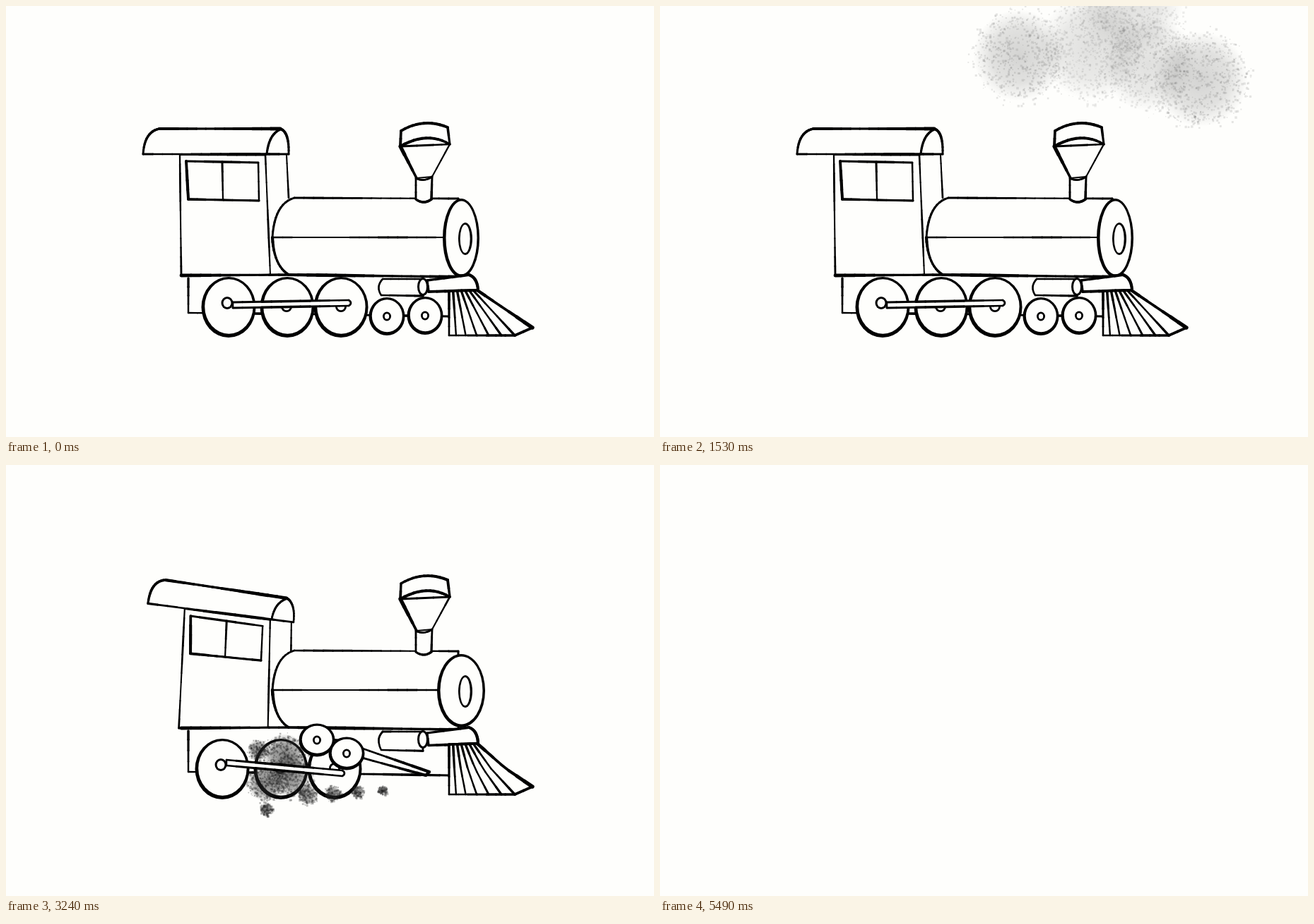
Animation of 917 by 611 pixels, one loop 5.58 s. Source, as an HTML page with a canvas:

```html
<!DOCTYPE html>
<html lang="en">
<head>
<meta charset="utf-8">
<title>Little engine</title>
<style>
html, body { margin: 0; width: 100%; height: 100%; overflow: hidden; background: #fefefc; }
canvas { display: block; }
</style>
</head>
<body>
<canvas id="stage" width="917" height="611"></canvas>
<script>
const ctx = document.getElementById('stage').getContext('2d');
const PAPER = '#fefefc', INK = '#000', STEP = 90, STEPS = 62, LAUNCH = 50;

const lerp = (a, b, k) => a + (b - a) * k;
const clamp = v => Math.min(1, Math.max(0, v));
const between = (p, q, k) => [lerp(p[0], q[0], k), lerp(p[1], q[1], k)];

function ramp(s, a, b) {
  const t = clamp((s - a) / (b - a));
  return t * t * (3 - 2 * t);
}

const hump = (s, a, b) => Math.sin(Math.PI * clamp((s - a) / (b - a))) ** 2;

// bend: nose dips; tilt: cab rocks; swing: front wheels jump back; go: long travelling shape
function poseAt(s) {
  const ready = hump(s, 0, 8), windup = hump(s, 44, LAUNCH);
  const swing = ramp(s, 21, 25) * (1 - ramp(s, 40, 43)) * Math.cos(Math.PI * (s - 25) / 11) ** 2;
  return {
    bend: ramp(s, 8, 10) * (1 - ramp(s, 14, 17)),
    tilt: ready + swing + windup,
    stretch: 1 + .03 * ready + .09 * windup,
    swing,
    go: s < LAUNCH ? 0 : 1
  };
}

// Each warp moves a point of the resting engine into the pose.
function warps({ bend, tilt, go }) {
  const body = ([x, y]) => {
    const u = x - 470, k = (u < 0 ? .00065 : .0008) * bend, t = clamp((x - 377) / 265);
    return [
      x - 2 * k * u * (u < 0 ? .4 : .7) * (y - 312) + go * (215 + 80 * t * t),
      y - 16 * bend + k * u * u + 9 * go - 9 * tilt * clamp((430 - y) / 30)
    ];
  };
  const cab = ([x, y]) => {
    const [bx, by] = body([x, y]), h = clamp((382 - y) / 200);
    return [bx + tilt * .06 * (325 - y), by + tilt * h * (9 + .15 * (x - 290))];
  };
  const gear = ([x, y]) => [
    x - 9 * tilt + go * (248 + .13 * (x - 315)),
    body([x, 440])[1] + y - 440 + 4 * tilt
  ];
  const base = body([591, 272]), turn = .45 * bend;
  const stack = ([x, y]) => {
    const h = y * (1 + .3 * bend);
    return [base[0] + x * Math.cos(turn) - h * Math.sin(turn), base[1] + x * Math.sin(turn) + h * Math.cos(turn)];
  };
  return { body, cab, gear, stack };
}

// Points along a quadratic curve
function bow(a, c, b) {
  return Array.from({ length: 13 }, (_, i) => between(between(a, c, i / 12), between(c, b, i / 12), i / 12));
}

function brush(warp, width, points, fill) {
  const dots = [];
  points.forEach((p, i) => {
    const q = points[i + 1] || p, n = Math.ceil(Math.hypot(q[0] - p[0], q[1] - p[1]) / 14) || 1;
    for (let k = 0; k < n; k++) dots.push(warp(between(p, q, k / n)));
  });
  if (fill) {
    ctx.fillStyle = PAPER;
    ctx.beginPath();
    dots.forEach(p => ctx.lineTo(...p));
    ctx.fill();
  }
  for (let i = 1; i < dots.length; i++) {
    const [x, y] = dots[i];
    ctx.lineWidth = width * (1 + .2 * Math.sin(x * .03 + y * .05));
    ctx.beginPath();
    ctx.moveTo(...dots[i - 1]);
    ctx.lineTo(x, y);
    ctx.stroke();
  }
}

const line = (warp, width, ...points) => brush(warp, width, points, false);
const area = (warp, width, ...points) => brush(warp, width, [...points, points[0]], true);

function oval(x, y, rx, ry, color) {
  ctx.fillStyle = color;
  ctx.beginPath();
  ctx.ellipse(x, y, rx, ry, 0, 0, 7);
  ctx.fill();
}

function ring([x, y], rx, ry, w, dx = 0, dy = 0) {
  oval(x, y, rx, ry, INK);
  oval(x + dx, y + dy, rx - w, ry - w, PAPER);
}

function drawCab({ cab }) {
  area(cab, 2.4, [246, 211], [248, 382], [374, 381], [367, 211]);
  line(cab, 2.5, [397, 211], [400, 272]);
  area(cab, 3.2, ...bow([194, 210], [196, 178], [217, 174]), ...bow([388, 174], [401, 178], [400, 210]));
  line(cab, 4, [217, 174], [388, 174]);
  line(cab, 2.8, ...bow([369, 210], [372, 182], [388, 175]));
  area(cab, 2.8, [255, 220], [357, 222], [358, 276], [258, 274]);
  line(cab, 3.5, [255, 220], [258, 274], [358, 276]);
  line(cab, 2.6, [306, 222], [307, 274]);
}

function drawBoiler({ body }, { bend, tilt, go }) {
  const top = [408, 272], low = [400, 381], heavy = 1 + .35 * Math.max(bend, go);
  const back = [...bow(top, [380, 280], [377, 328]), ...bow([377, 328], [379, 368], low)];
  area(body, 2.6 * heavy, [640, 273], ...back, [640, 384]);
  line(body, 4, ...bow([377, 328], [379, 368], low));
  line(body, 2.4 * heavy, [378, 328], [622, 328]);
  line(body, 4, [248, 382], low, [640, 384]);
  ring(body([644, 329]), 26 + 12 * bend + 8 * tilt + go, 56 - 4 * bend - 4 * tilt, 4, .5, -.5);
  ring(body([650, 330]), 10 + 9 * bend, 23, 3 + 2 * bend, -.3, 0);
}

function drawStack({ stack }, { bend, go }) {
  const slim = 1 - .45 * Math.max(bend, go), lid = 22 * (1 - .6 * bend);
  const left = [-33, -73], right = [37, -76];
  const brim = bow(right, [5, -95], left);
  area(stack, 2.6, left, [-10 * slim, -28], [12 * slim, -30], right);
  line(stack, 4.5, left, [-10 * slim, -28]);
  area(stack, 3.4 + 1.6 * bend, ...brim, ...bow([-32, -73 - lid], [0, -92 - lid], [34, -78 - lid]));
  area(stack, 3.4, ...bow([-11 * slim, -28], [0, -22], [12 * slim, -30]), ...bow([11 * slim, 2], [0, 10], [-11 * slim, 2]));
}

function drawNose({ body }, { go }) {
  const pipe = p => body([p[0] + 14 * go, p[1]]);
  area(body, 3.5, [596, 389], [655, 381], ...bow([655, 381], [667, 385], [668, 403]), [598, 405]);
  area(pipe, 3, [590, 387], ...bow([533, 387], [523, 398], [531, 410]), [590, 411]);
  ring(pipe([590, 398]), 8, 13, 3);

  const near = [627, 404], far = [667, 403], foot = [627, 467], toe = [720, 467], tip = [745, 456];
  area(body, 3.2, near, foot, toe, tip, far);
  for (let k = 1; k <= 6; k++) line(body, 3, between(near, far, k / 7), between(foot, toe, (k / 6) ** 1.25));
  line(body, 4.5, far, tip);
}

function drawWheels({ gear }, { bend, go }) {
  for (const x of [315, 398, 474]) {
    ring(gear([x, 427]), 38.5 + 2 * go, 43 + 2 * bend + go, 4.3, .4, lerp(-1, 1.4, bend));
  }
  ring(gear([313, 421]), 8.5, 9, 3);
  for (const x of [397, 474]) ring(gear([x, 426]), 8, 8, 2.8);
}

function drawRunningGear({ gear }, { swing, go }) {
  const turn = Math.max(swing, go), y1 = 424 - 6 * turn - 8 * go, y2 = 421 + 12 * turn - 10 * go;
  area(gear, 3, [321, y1 - 4], [485, y2 - 4], ...bow([485, y2 - 4], [491, y2], [485, y2 + 4]), [321, y1 + 4]);

  const first = [539 - 90 * swing, 440 - 54 * swing], second = [593 - 102 * swing, 439 - 34 * swing];
  const end = [608, 431];
  if (swing > .02) line(gear, 3.4, [second[0] + 20, second[1] - 8], end, [end[0] - 5, end[1] + 5], second);
  for (const hub of [first, second]) {
    const at = gear(hub);
    ring(at, 25.5 + 5 * go, 27 - 3.5 * swing + 9 * go, 4, .3, -.8);
    ring(at, 6, 6.5, 2.8);
  }
}

function drawEngine(pose, beforeRods) {
  const w = warps(pose);
  line(w.body, 3, [258, 386], [258, 435], [440, 437], [627, 440]);
  drawCab(w);
  drawBoiler(w, pose);
  drawStack(w, pose);
  drawNose(w, pose);
  drawWheels(w, pose);
  if (beforeRods) beforeRods();
  drawRunningGear(w, pose);
}

function random(seed) {
  return () => (seed = seed * 16807 % 2147483647) / 2147483647;
}

// A soft grey core with a ragged, speckled rim
function puff(x, y, r, dark, seed) {
  const rnd = random(seed), glow = ctx.createRadialGradient(x, y, 0, x, y, r);
  glow.addColorStop(0, `rgba(30,30,30,${dark})`);
  glow.addColorStop(.6, `rgba(50,50,50,${dark * .75})`);
  glow.addColorStop(1, 'rgba(60,60,60,0)');
  oval(x, y, r, r, glow);
  ctx.fillStyle = `rgba(35,35,35,${dark * .6})`;
  for (let n = 30 + r * 9; n > 0; n--) {
    const a = rnd() * 6.283, d = r * Math.sqrt(rnd()) * (.85 + .3 * rnd()), s = 1 + rnd() * 2.5;
    ctx.fillRect(x + Math.cos(a) * d, y + Math.sin(a) * d, s, s);
  }
}

function drawBurst(age) {
  const grow = age < 0 ? .5 : 1 + age * .2, rise = age < 0 ? -15 : age * 10;
  const fade = 1 - Math.max(0, age) / 9;
  const lobes = [[-55, 0, 27, .85], [-12, -5, 31, .6], [10, -32, 32, .6], [22, 5, 28, .6], [52, 14, 28, .85]];
  lobes.forEach(([x, y, r, dark], i) => puff(640 + x * grow, 140 + y * grow - rise, r * grow, dark * fade, 50 + i));
}

function drawDust(age) {
  const fade = age > 0 ? 1 - age / 5 : 1 + age / 3, drop = age * 3;
  const heap = [[357, 404, 15], [394, 412, 31], [368, 450, 27], [402, 440, 31], [368, 488, 9]];
  heap.forEach(([x, y, r], i) => puff(x - drop, y + drop, r, .55 * fade, 70 + i));
  for (let k = 0; k < 4; k++) puff(427 + 35 * k - drop, 467 - 2 * k + drop, 14 - 2.5 * k, .5 * fade, 90 + k);
}

function drawTrail(shift) {
  for (const k of [0, 1, 2, 3, 5, 6, 9]) {
    const x = 847 - 33 * k + shift;
    if (x > 545) puff(x, 104 + 48 * Math.exp(-.9 * k), 18 + 11 * Math.exp(-.4 * k), k ? .42 : .75, 120 + k);
  }
}

function chug(step) {
  const pose = poseAt(step), age = step - 10;
  if (age >= -1 && age < 9) drawBurst(age);
  ctx.save();
  ctx.translate(0, 470 * (1 - pose.stretch));
  ctx.scale(1, pose.stretch);
  drawEngine(pose, () => {
    const phase = (step - 14) % 11, since = phase > 8 ? phase - 11 : phase;
    if (step > 22 && step < 42 && since < 5) drawDust(since);
  });
  ctx.restore();
}

function depart(step) {
  const shift = (step - 53) * 70;
  drawTrail(shift);
  ctx.save();
  ctx.translate(shift, 0);
  drawEngine(poseAt(step));
  ctx.restore();
}

const start = performance.now();
let shown = -1;

function tick() {
  const step = Math.floor((performance.now() - start) / STEP) % STEPS;
  if (step !== shown) {
    shown = step;
    ctx.lineJoin = ctx.lineCap = 'round';
    ctx.strokeStyle = INK;
    ctx.fillStyle = PAPER;
    ctx.fillRect(0, 0, 917, 611);
    if (step < LAUNCH) chug(step);
    else if (step < STEPS - 1) depart(step);
  }
  requestAnimationFrame(tick);
}
tick();
</script>
</body>
</html>
```
